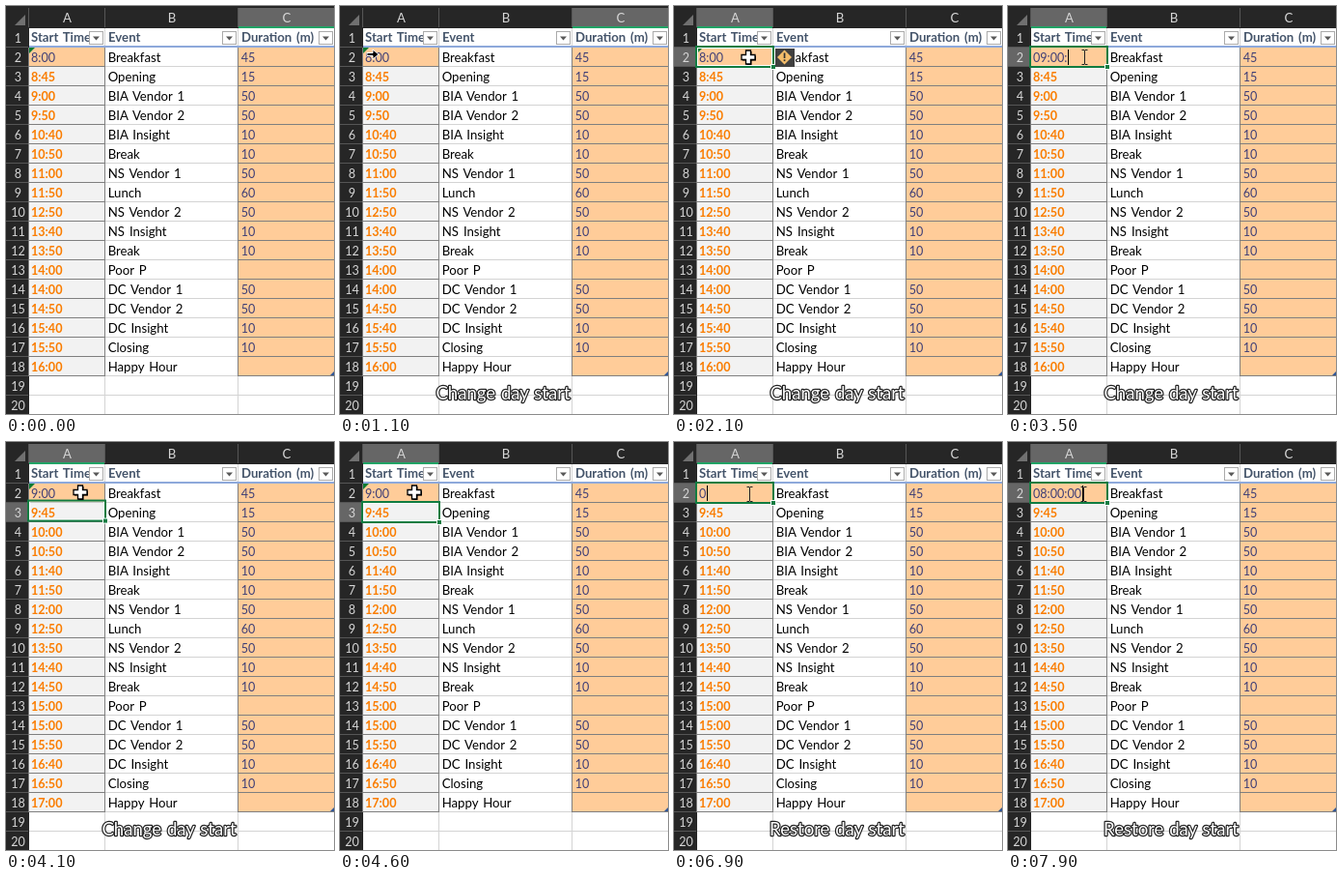
Write an HTML page that moves like this. It is 340 px wide and 422 px high and loops after 8 s.

```html
<!DOCTYPE html>
<html lang="en">
<head>
<meta charset="utf-8">
<title>Schedule sheet</title>
<style>
  html, body { margin: 0; width: 100%; height: 100%; overflow: hidden; background: #fff; }
  svg { display: block; width: 340px; height: 422px; }
  text { font: 13.2px Lato, Carlito, sans-serif; word-spacing: 1.6px; white-space: pre; }
  .num { font-size: 12.6px; }
  .bold { font-weight: 700; }
  .head { fill: #d6d6d6; text-anchor: middle; }
  .caption { font-size: 18.6px; word-spacing: 1px; text-anchor: middle; fill: #fff; stroke: #222; stroke-width: 2.4px;
    stroke-linejoin: round; paint-order: stroke; }
</style>
</head>
<body>
<svg id="stage" viewBox="0 0 340 422"></svg>
<script>
const NS = 'http://www.w3.org/2000/svg';
const stage = document.getElementById('stage');
const LOOP = 8000;

const GREEN = '#107c41', ACCENT = '#21a366', PEACH = '#ffcc99', EDGE = '#7f7f7f', GRID = '#d4d4d4';
const DARK = '#262626', LIT = '#666';

const agenda = [
  ['Breakfast', 45], ['Opening', 15], ['BIA Vendor 1', 50], ['BIA Vendor 2', 50],
  ['BIA Insight', 10], ['Break', 10], ['NS Vendor 1', 50], ['Lunch', 60],
  ['NS Vendor 2', 50], ['NS Insight', 10], ['Break', 10], ['Poor P', 0],
  ['DC Vendor 1', 50], ['DC Vendor 2', 50], ['DC Insight', 10], ['Closing', 10],
  ['Happy Hour', 0]
];
const columns = [['A', 24, 79], ['B', 103, 138], ['C', 241, 100]];

function el(tag, attrs, parent = stage) {
  const node = document.createElementNS(NS, tag);
  for (const key in attrs) node.setAttribute(key, attrs[key]);
  parent.appendChild(node);
  return node;
}
const group = (parent) => el('g', {}, parent);
const box = (x, y, width, height, fill, parent) => el('rect', { x, y, width, height, fill }, parent);
const path = (d, fill, parent, more) => el('path', { d, fill, ...more }, parent);
function label(str, x, y, cls, fill, parent) {
  const node = el('text', { x, y, class: cls }, parent);
  if (fill) node.setAttribute('fill', fill);
  node.textContent = str;
  return node;
}
const show = (node, on) => node.setAttribute('visibility', on ? 'visible' : 'hidden');
const place = (node, x, y) => node.setAttribute('transform', `translate(${x} ${y})`);
const rowTop = n => 23 + 20 * (n - 1);
const clock = m => Math.floor(m / 60) + ':' + String(m % 60).padStart(2, '0');

// Sheet background and grid
box(0, 0, 340, 422, '#fff');
for (let n = 1; n <= 20; n++) box(24, rowTop(n) + 19, 316, 1, GRID);
for (const x of [102, 240]) box(x, 23, 1, 399, GRID);

// Column and row headings
box(0, 0, 340, 23, DARK);
box(0, 0, 24, 422, DARK);
path('M20 9V20H9Z', '#707070');
const colHeads = columns.map(([name, x, w]) => {
  const lit = group();
  box(x, 2, w - 1, 20, LIT, lit);
  box(x, 21, w - 1, 2, ACCENT, lit);
  label(name, x + w / 2, 17, 'head');
  box(x - 1, 2, 1, 20, '#565656');
  return lit;
});
const rowHeads = [];
for (let n = 1; n <= 20; n++) {
  const y = rowTop(n), lit = group();
  box(0, y, 23, 19, LIT, lit);
  box(22, y, 2, 19, ACCENT, lit);
  rowHeads[n] = lit;
  label(n, 12.5, y + 14.5, 'head num');
  box(0, y + 19, 23, 1, '#565656');
}

// Table
['Start Time', 'Event', 'Duration (m)'].forEach((title, i) => {
  const [, x, w] = columns[i];
  label(title, x + (i ? 3 : 2), 37, 'bold', '#44546a');
  const right = Math.min(x + w - 2, 339);
  el('rect', { x: right - 14.5, y: 26.5, width: 14, height: 13, fill: '#fff', stroke: '#ababab' });
  path(`M${right - 11} 31.5h7l-3.5 4z`, '#595959');
});
box(24, 41, 316, 2, '#8ea9db');

const times = agenda.map(([event, minutes], i) => {
  const y = rowTop(i + 2), first = i === 0;
  box(24, y, 78, 19, first ? PEACH : '#f2f2f2');
  box(24, y + 19, 79, 1, EDGE);
  box(241, y, 99, 19, PEACH);
  box(241, y + 19, 99, 1, EDGE);
  label(event, 105.7, y + 14.5);
  label(minutes || '', 243.8, y + 14.5, 'num', '#3f3f76');
  return label('', 26, y + 14.5, first ? 'num' : 'num bold', first ? '#3f3f76' : '#fa7d00');
});
for (const x of [23, 102, 240]) box(x, 43, 1, 340, EDGE);
path('M340 378V382H336Z', '#2f5597');
const flag = path('M24 43h6l-6 6z', '#0b7a33');

// Active cell frame, drawn at row 2
const frame = group();
const inset = el('rect', { x: 24.5, y: 43.5, width: 77, height: 18, fill: 'none', stroke: '#fff' }, frame);
el('rect', { x: 23, y: 42, width: 80, height: 21, fill: 'none', stroke: GREEN, 'stroke-width': 2 }, frame);
box(100, 60, 6, 6, '#fff', frame);
box(101, 61, 4, 4, GREEN, frame);

const caret = box(0, 45, 1, 16, '#000');

const warning = group();
box(105, 44, 20, 19, '#404040', warning);
path('M114.5 45.5l7.5 7.5-7.5 7.5-7.5-7.5z', '#f4bd6a', warning);
box(113.7, 48.5, 1.7, 5.5, '#333', warning);
box(113.7, 55.3, 1.7, 1.8, '#333', warning);

const caption = label('', 169, 407, 'caption');

// Pointers, each centred on its own origin
const arrow = path('M-6-1.5h6v-3.5l6 5-6 5v-3.5h-6z', '#000', stage, { stroke: '#fff', 'stroke-width': 1 });
const cross = group();
const plus = 'M-2.5-7h5v4.5h4.5v5h-4.5v4.5h-5v-4.5h-4.5v-5h4.5z';
path(plus, '#000', cross, { transform: 'translate(1 1)' });
path(plus, '#fff', cross, { stroke: '#000', 'stroke-width': 1.3 });
const beam = path('M-3-7.5h2.5l.5.5.5-.5h2.5M0-7V7M-3 7.5h2.5l.5-.5.5.5h2.5', 'none', stage, { stroke: '#222' });

// Key strokes: time of each character
const entries = [
  { text: '09:00:00', keys: [2800, 2900, 3100, 3200, 3300, 3500, 3600, 3700], end: 3900 },
  { text: '08:00:00', keys: [6900, 7100, 7300, 7400, 7500, 7600, 7800, 7900], end: LOOP }
];

const ramp = (t, a, b) => Math.min(1, Math.max(0, (t - a) / (b - a)));
const ease = k => k * k * (3 - 2 * k);

// Pointer stops: time, x, y
const stops = [[500, 14, 434], [1100, 34, 50], [1300, 34, 51], [1800, 77, 53], [2800, 77, 53],
  [2900, 79, 53], [3900, 79, 53], [4000, 77, 52], [4800, 77, 52], [5200, 76, 54], [6900, 76, 54], [6901, 78, 54]];
function pointerAt(t) {
  let i = 0;
  while (i < stops.length - 2 && t >= stops[i + 1][0]) i++;
  const [t0, x0, y0] = stops[i], [t1, x1, y1] = stops[i + 1];
  const k = ease(ramp(t, t0, t1));
  return [x0 + (x1 - x0) * k, y0 + (y1 - y0) * k];
}

function update(t) {
  const picked = t >= 1900;
  const lower = t >= 3900 && t < 5400;
  const entry = entries.find(e => t >= e.keys[0] && t < e.end);

  // Start times follow from the first one and the durations
  let minute = t < 3900 ? 480 : 540;
  agenda.forEach(([, minutes], i) => {
    times[i].textContent = clock(minute);
    minute += minutes;
  });
  if (entry) times[0].textContent = entry.text.slice(0, entry.keys.filter(k => t >= k).length);
  show(caret, entry);
  if (entry) caret.setAttribute('x', Math.round(26.5 + times[0].getComputedTextLength()));

  show(colHeads[0], picked);
  show(colHeads[1], false);
  show(colHeads[2], !picked);
  rowHeads.forEach((node, n) => show(node, picked && n === (lower ? 3 : 2)));
  show(frame, picked);
  show(inset, picked && !entry);
  place(frame, 0, 20 * (ease(ramp(t, 3850, 4150)) - ease(ramp(t, 5350, 5500))));
  show(flag, !entry);
  show(warning, !entry && ((t >= 2000 && t < 2800) || t >= 5500));

  const second = t >= 4600;
  caption.textContent = second ? 'Restore day start' : 'Change day start';
  caption.setAttribute('opacity', second ? ramp(t, 4700, 5200) : ramp(t, 400, 900));

  const [x, y] = pointerAt(t);
  show(arrow, t >= 500 && x < 40);
  show(cross, x >= 40 && !entry);
  show(beam, entry);
  for (const node of [arrow, cross]) place(node, x, y);
  place(beam, Math.round(x) + 0.5, Math.round(y));
}

function tick(now) {
  update(now % LOOP);
  requestAnimationFrame(tick);
}
update(0);
requestAnimationFrame(tick);
</script>
</body>
</html>
```
